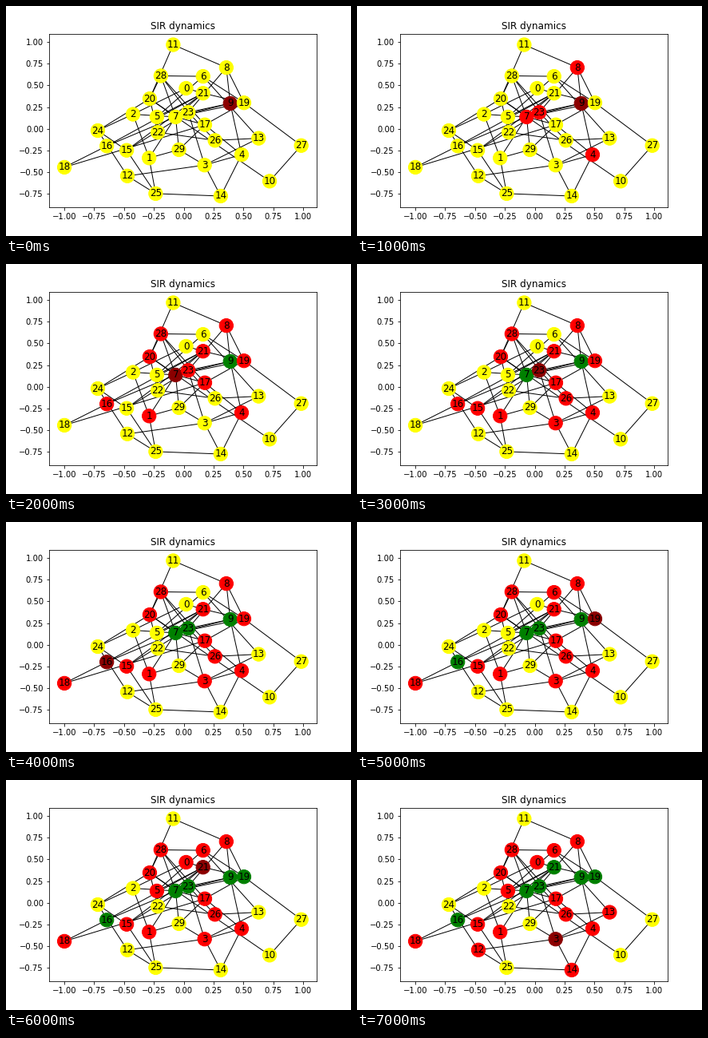
These frames come from a looping animation (432x288 px, 8 s). A matplotlib script:

```python
from itertools import pairwise

import matplotlib.pyplot as plt
from matplotlib.animation import FuncAnimation
from matplotlib.collections import LineCollection

plt.rcParams["font.family"] = "DejaVu Sans"

POS = [
    (.02, .467), (-.29, -.335), (-.425, .168), (.175, -.417), (.485, -.297),
    (-.225, .137), (.162, .604), (-.068, .137), (.357, .705), (.39, .293),
    (.72, -.602), (-.088, .968), (-.472, -.542), (.628, -.108), (.31, -.773),
    (-.478, -.247), (-.645, -.197), (.177, .047), (-1, -.442), (.505, .3),
    (-.285, .347), (.162, .41), (-.217, -.04), (.038, .19), (-.72, -.02),
    (-.235, -.745), (.262, -.133), (.985, -.192), (-.192, .61), (-.04, -.24),
]

# Walks through the network; consecutive nodes are linked.
WALKS = [
    (11, 8, 9, 4, 14, 25, 12, 24, 2, 7, 1, 25, 15, 23, 9, 7, 19, 27, 10, 20, 11),
    (18, 16, 7, 20, 28, 7, 21, 5, 6, 28, 17, 18),
    (2, 1, 29, 7, 17, 4, 3, 29, 17, 19, 6, 13, 3, 23, 26, 13),
    (12, 3, 14),
    (16, 21, 19, 8, 23, 28),
    (15, 24, 20, 22, 26),
    (15, 21, 0, 2),
]
EDGES = {frozenset(pair) for walk in WALKS for pair in pairwise(walk)}

SPREADERS = (9, 7, 23, 16, 19, 21, 3)
SPARED = {2, 10, 11, 22, 24, 25, 27, 29}


def neighbours(node):
    return {other for edge in EDGES if node in edge for other in edge - {node}}


def node_colors(step):
    """Each spreader infects its neighbours, then recovers a step later."""
    colors = ["yellow"] * len(POS)
    active = SPREADERS[:max(step, 1)]
    for node in active[:step]:
        for other in neighbours(node) - SPARED:
            colors[other] = "red"
    for node in active:
        colors[node] = "green"
    colors[active[-1]] = "darkred"
    return colors


fig = plt.figure(figsize=(6, 4), dpi=72, facecolor="white")
ax = fig.add_axes([.125, .125, .775, .755])
ax.set_xlim(-1.128, 1.113)
ax.set_ylim(-.902, 1.096)
ax.set_title("SIR dynamics", fontsize=12)

lines = [[POS[node] for node in sorted(edge)] for edge in EDGES]
ax.add_collection(LineCollection(lines, colors="black", linewidths=1, zorder=1))
dots = ax.scatter(*zip(*POS), s=300, c=node_colors(0), zorder=2)
for node, (x, y) in enumerate(POS):
    ax.text(x, y, str(node), fontsize=12, ha="center", va="center", zorder=3)


def update(step):
    dots.set_color(node_colors(step))
    return (dots,)


anim = FuncAnimation(fig, update, frames=len(SPREADERS) + 1, interval=1000,
                     repeat=True, repeat_delay=0)
plt.show()
```
